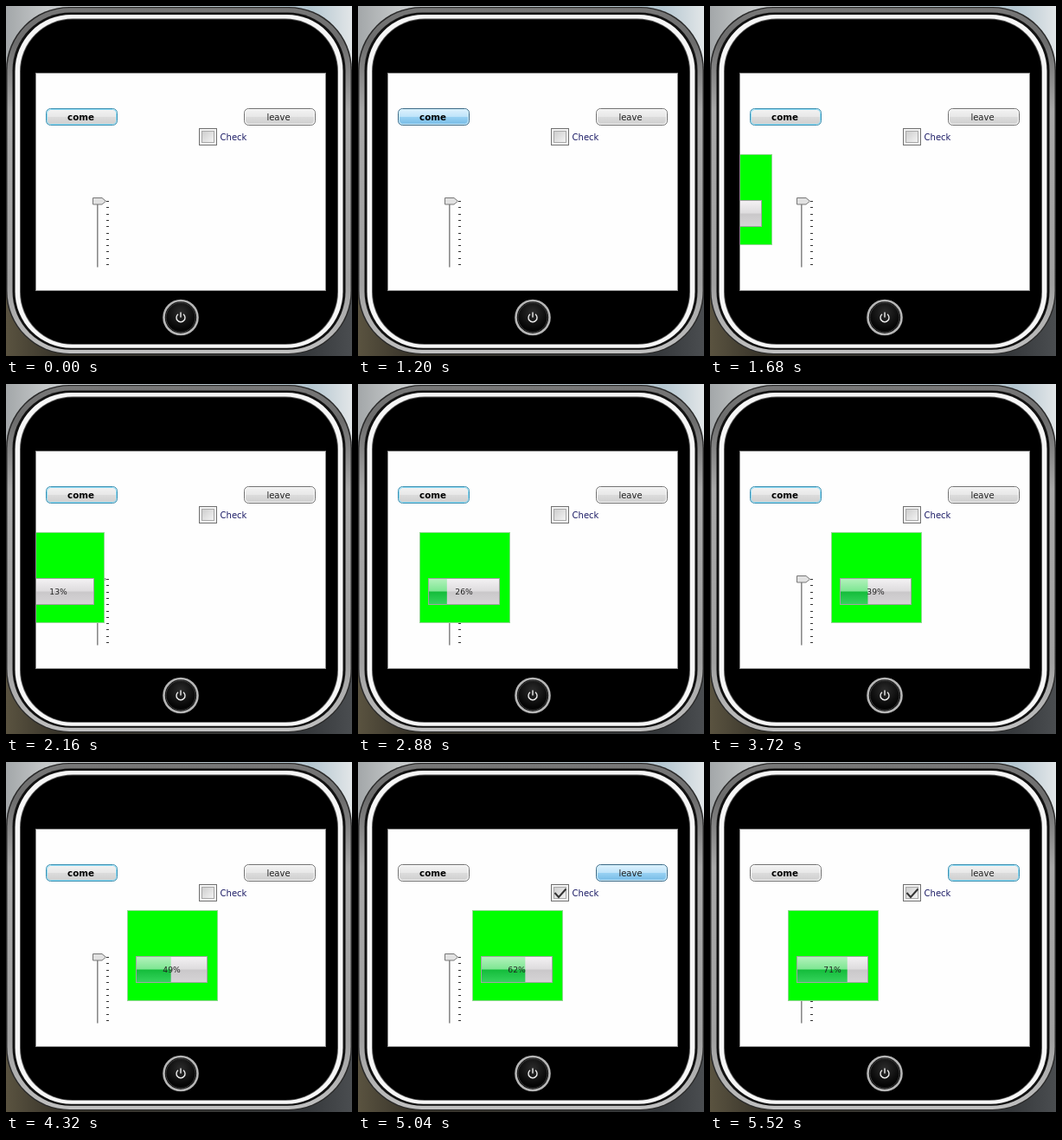
An HTML page for the animation above (5640 ms loop, 400x404 px).

```html
<!DOCTYPE html>
<html lang="en">
<head>
<meta charset="utf-8">
<title>Panel with sliding box</title>
<style>
html, body { margin: 0; width: 100%; height: 100%; overflow: hidden; background: #000; }
svg { display: block; width: 400px; height: 404px; }
text { font: 10px "DejaVu Sans", Verdana, sans-serif; fill: #222; text-anchor: middle; }
.button rect { fill: url(#face); stroke: #707070; }
.button .inner { fill: none; stroke: #fafafa; }
.button.focus rect { stroke: #3c8fb0; }
.button.focus .inner { stroke: #8fdcf5; }
.button.pressed rect { fill: url(#hot); stroke: #3c6a86; }
.button.pressed .inner { fill: none; stroke: #d3effc; }
</style>
</head>
<body>
<svg viewBox="0 0 400 404">
  <defs>
    <linearGradient id="sky" x2="1" y2="0">
      <stop offset="0" stop-color="#a3a7a9"/><stop offset=".12" stop-color="#c6c9ca"/>
      <stop offset=".88" stop-color="#b4c6d0"/><stop offset="1" stop-color="#e2e6e8"/>
    </linearGradient>
    <linearGradient id="ground" x2="1" y2="0">
      <stop offset="0" stop-color="#5a5340"/><stop offset=".15" stop-color="#38342a"/>
      <stop offset=".86" stop-color="#34373a"/><stop offset="1" stop-color="#4a4d50"/>
    </linearGradient>
    <linearGradient id="chrome" x2="0" y2="1">
      <stop offset="0" stop-color="#777"/><stop offset=".1" stop-color="#6c6c6c"/>
      <stop offset=".3" stop-color="#a8a8a8"/><stop offset=".8" stop-color="#a0a0a0"/>
      <stop offset="1" stop-color="#c0c0c0"/>
    </linearGradient>
    <linearGradient id="face" x2="0" y2="1">
      <stop offset="0" stop-color="#f3f3f3"/><stop offset=".48" stop-color="#e8e8e8"/>
      <stop offset=".52" stop-color="#dcdcdc"/><stop offset="1" stop-color="#cecece"/>
    </linearGradient>
    <linearGradient id="hot" x2="0" y2="1">
      <stop offset="0" stop-color="#dff2fd"/><stop offset=".48" stop-color="#bfe4fa"/>
      <stop offset=".52" stop-color="#98d1f3"/><stop offset="1" stop-color="#73b9e4"/>
    </linearGradient>
    <linearGradient id="well" x2="1" y2="1">
      <stop offset="0" stop-color="#cdcdcd"/><stop offset="1" stop-color="#f4f4f4"/>
    </linearGradient>
    <linearGradient id="track" x2="0" y2="1">
      <stop offset="0" stop-color="#f4f2f4"/><stop offset=".48" stop-color="#dedcde"/>
      <stop offset=".52" stop-color="#cac8ca"/><stop offset="1" stop-color="#d6d4d6"/>
    </linearGradient>
    <linearGradient id="done" x2="0" y2="1">
      <stop offset="0" stop-color="#b4f2bd"/><stop offset=".48" stop-color="#7ee693"/>
      <stop offset=".52" stop-color="#15bc3c"/><stop offset="1" stop-color="#35d45c"/>
    </linearGradient>
    <radialGradient id="knob" cy=".35">
      <stop offset="0" stop-color="#2c2c2c"/><stop offset="1" stop-color="#050505"/>
    </radialGradient>
    <clipPath id="view"><rect x="35" y="78" width="334" height="250"/></clipPath>
  </defs>

  <rect width="400" height="202" fill="url(#sky)"/>
  <rect y="202" width="400" height="202" fill="url(#ground)"/>
  <g id="shell"></g>
  <rect x="34.5" y="77.5" width="335" height="251" fill="#fefefe" stroke="#8a8a8a"/>

  <g fill="none">
    <circle cx="202" cy="359.5" r="19.5" fill="url(#knob)" stroke="#b5b5b5" stroke-width="2.6"/>
    <circle cx="202" cy="359.5" r="17" stroke="#3a3a3a"/>
    <path d="M199 355.7a5 5 0 1 0 6 0M202 353.5v6" stroke="#eee" stroke-width="1.4"/>
  </g>

  <g class="button" id="come">
    <rect x="46.5" y="118.5" width="82" height="19" rx="5"/>
    <rect class="inner" x="47.5" y="119.5" width="80" height="17" rx="4"/>
    <text x="86.5" y="132" style="font-weight:bold;font-size:10.3px;fill:#000">come</text>
  </g>
  <g class="button" id="leave">
    <rect x="275.5" y="118.5" width="82" height="19" rx="5"/>
    <rect class="inner" x="276.5" y="119.5" width="80" height="17" rx="4"/>
    <text x="315" y="132">leave</text>
  </g>

  <rect x="223.5" y="141.5" width="20" height="19" fill="#f4f4f4" stroke="#707070"/>
  <rect x="226.5" y="144.5" width="14" height="13" fill="url(#well)" stroke="#a8a8a8"/>
  <path id="tick" d="M227.5 151l4.5 5 8.5-9.5" fill="none" stroke="#333" stroke-width="2"/>
  <text x="263" y="155" style="fill:#1c1c66">Check</text>

  <g id="slider">
    <path d="M105.5 226V301.5" stroke="#888"/>
    <path d="M106.5 226V301.5" stroke="#bbb"/>
    <path d="M100.5 221.5H111L115.5 225.3L111 229H100.5Z" fill="#e2e2e2" stroke="#777"/>
  </g>

  <g clip-path="url(#view)">
    <g id="box">
      <rect x=".5" y="171.5" width="104" height="104" fill="#0f0" stroke="#8fd88f"/>
      <rect x="10.5" y="224.5" width="82" height="30" fill="url(#track)"/>
      <rect id="bar" x="10.5" y="224.5" height="30" fill="url(#done)"/>
      <rect x="10.5" y="224.5" width="82" height="30" fill="none" stroke="#a2a2a2"/>
      <text id="label" x="51.5" y="243" style="font-size:9.2px"></text>
    </g>
  </g>
</svg>
<script>
const LOOP = 5640, HOLD = 1200, STEP = 120;
const SPEED = 10.4, REST = 140, LEAVE_AT = 31.2;
const $ = id => document.getElementById(id);

function add(parent, tag, attrs) {
  const el = document.createElementNS("http://www.w3.org/2000/svg", tag);
  for (const key in attrs) el.setAttribute(key, attrs[key]);
  parent.append(el);
}

// Nested rounded rings of the case: inset, radius, colour
for (const [inset, rx, fill] of [
  [0, 73, "#2a2a2a"], [1.5, 72, "url(#chrome)"], [7.5, 67, "#111"],
  [10.5, 65, "#f6f6f6"], [16, 61, "#555"], [17, 60, "#000"]
]) add($("shell"), "rect", {
  x: inset, y: inset * .85 + 1, rx, fill,
  width: 400 - 2 * inset, height: 401 - 1.55 * inset
});

for (let i = 0; i < 11; i++)
  add($("slider"), "rect", { x: 116, y: Math.round(225 + i * 7.3), width: 3, height: 1, fill: "#333" });

// Progress in percent at given steps
const progress = [[0, 0], [1, 0], [8, 13], [14, 26], [18, 33], [26, 49], [36, 71]];

function percent(n) {
  const k = Math.max(1, progress.findIndex(p => p[0] >= n));
  const [a, b] = [progress[k - 1], progress[k]];
  return Math.round(a[1] + (b[1] - a[1]) * (n - a[0]) / (b[0] - a[0]));
}

function boxLeft(n) {
  return n < LEAVE_AT
    ? Math.min(REST, 9 + (n - 8) * SPEED)
    : REST - (n - LEAVE_AT) * SPEED;
}

function draw(time) {
  const t = time % LOOP;
  const n = t < HOLD ? -1 : Math.floor((t - HOLD) / STEP);
  const p = percent(Math.max(0, n));
  $("box").setAttribute("transform", `translate(${n < 0 ? -200 : Math.round(boxLeft(n))})`);
  $("bar").setAttribute("width", p * .82);
  $("label").textContent = p + "%";
  $("tick").style.display = n >= 28 ? "" : "none";
  $("come").classList.toggle("focus", n < 28);
  $("come").classList.toggle("pressed", n === 0 || n === 1);
  $("leave").classList.toggle("focus", n >= 31);
  $("leave").classList.toggle("pressed", n === 31 || n === 32);
}

const start = performance.now();
function frame() {
  draw(performance.now() - start);
  requestAnimationFrame(frame);
}
frame();
</script>
</body>
</html>
```
